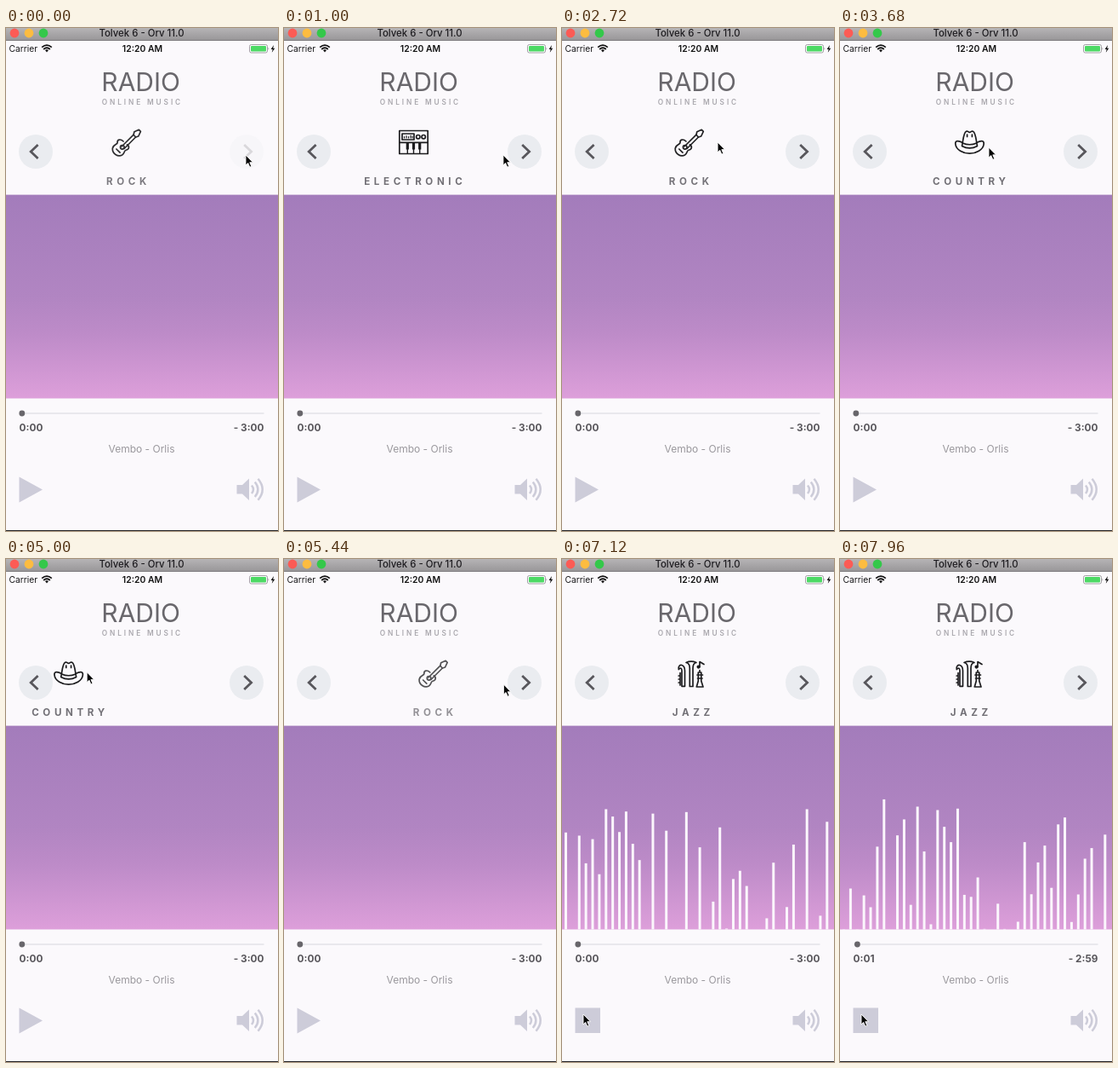
Recreate the animation shown at these times as an HTML page. Size 320 by 590 pixels, loop 8 s.

```html
<!DOCTYPE html>
<html lang="en">
<head>
<meta charset="utf-8">
<title>Radio player</title>
<style>
  html, body { margin: 0; width: 100%; height: 100%; overflow: hidden; background: #fbf9fc; }
  svg { display: block; width: 320px; height: 590px; font-family: Inter, Roboto, sans-serif; }
  .mid { text-anchor: middle; }
  .line { fill: none; stroke: #1c1c1e; stroke-width: 1.7; stroke-linecap: round; stroke-linejoin: round; }
  .label { font-size: 11.6px; font-weight: 700; letter-spacing: 4.6px; fill: #727076; text-anchor: middle; }
  .time { font-size: 11.8px; font-weight: 700; fill: #59575c; }
  .chevron { fill: none; stroke: #58575c; stroke-width: 2.8; }
  .control { fill: #cdccd9; }
</style>
</head>
<body>
<svg viewBox="0 0 320 590">
  <defs>
    <linearGradient id="chrome" x2="0" y2="1">
      <stop stop-color="#b6b4b6"/><stop offset="1" stop-color="#989698"/>
    </linearGradient>
    <linearGradient id="sky" x2="0" y2="1">
      <stop stop-color="#a37cbb"/><stop offset=".5" stop-color="#b185c2"/>
      <stop offset=".68" stop-color="#bd8bc8"/><stop offset="1" stop-color="#dd9fda"/>
    </linearGradient>
  </defs>
  <rect width="320" height="590" fill="#fbf9fc"/>

  <!-- window bar -->
  <rect width="320" height="14.5" fill="url(#chrome)"/>
  <rect y="14" width="320" height="1" fill="#7e7c7e"/>
  <circle cx="10" cy="6" r="5.4" fill="#fc5b55"/>
  <circle cx="27" cy="6" r="5.4" fill="#fdbc40"/>
  <circle cx="44" cy="6" r="5.4" fill="#34c84a"/>
  <text class="mid" x="159.5" y="10" font-size="11.4" font-weight="500" fill="#1e1c20">Tolvek 6 - Orv 11.0</text>

  <!-- status bar -->
  <text x="3.5" y="28" font-size="10.3" fill="#1a1a1c">Carrier</text>
  <g fill="none" stroke="#111" stroke-width="1.8">
    <path d="M42.2 22.6Q48 17.6 53.8 22.6M44.2 25Q48 21.6 51.8 25"/>
    <path d="M46 26L48 28.6 50 26Q48 24.6 46 26Z" fill="#111" stroke="none"/>
  </g>
  <text class="mid" x="160.5" y="28" font-size="10.4" font-weight="600" fill="#111">12:20 AM</text>
  <rect x="286.5" y="19.5" width="21" height="9.5" rx="2" fill="none" stroke="#8c8b8f" stroke-width=".8"/>
  <rect x="288" y="21" width="18" height="6.5" rx="1" fill="#4cd964"/>
  <path d="M308.5 22.5q1.6 1.7 0 3.4z" fill="#8c8b8f"/>
  <path d="M315 20L311.6 24.9H313.7L312.8 28.8 316.3 23.7H314.2Z" fill="#111"/>

  <!-- heading -->
  <text class="mid" x="158.7" y="74" font-size="30" font-weight="400" fill="#69676c">RADIO</text>
  <text class="mid" x="160.4" y="89.8" font-size="8.3" font-weight="600" letter-spacing="2.9" fill="#aaa8ae">ONLINE MUSIC</text>

  <!-- genres -->
  <g id="rock">
    <g class="line">
      <path d="M148.5 133C145 129.5 141 131 141.5 134.5C141.8 136.5 136 136.5 135.7 141.5C135.5 147.5 142 151.5 147 149C150.5 147 148.8 144 151.5 143.3C155.5 142.3 156 138.5 152.8 136.8"/>
      <path d="M146.5 139L160.5 125.2M149.5 141.5L163 128"/>
      <path d="M160.5 125.2L161.3 121.8 166.8 119.3 168.8 121.3 166.2 127 163 128Z"/>
      <circle cx="147.2" cy="139.8" r="2.3"/>
      <path d="M140.3 142L144.5 146.2"/>
    </g>
    <text class="label" x="154.3" y="184">ROCK</text>
  </g>
  <g id="electronic">
    <g class="line" stroke-linejoin="miter">
      <rect x="135.8" y="120.5" width="33.4" height="27"/>
      <path d="M135.8 134.3H169.2"/>
      <rect x="139" y="124" width="14" height="7"/>
      <path d="M141.5 129V127.5M144 129V126.5M146.5 129V127.5M149 129V126M151 129V127" stroke-width="1.2"/>
      <circle cx="157.8" cy="127.7" r="2.2"/><circle cx="164.2" cy="127.7" r="2.2"/>
      <path d="M145.3 135V142.5M152.5 135V142.5M159.7 135V142.5" stroke-width="3.2" stroke-linecap="butt"/>
      <path d="M145.3 142V147M152.5 142V147M159.7 142V147" stroke-width="1.4"/>
    </g>
    <text class="label" x="154.3" y="184">ELECTRONIC</text>
  </g>
  <g id="country">
    <g class="line">
      <path d="M143.5 138.5C145 132 145 123 148.5 121.2C150.5 120.3 151 122.4 152.5 122.4C154 122.4 154.5 120.3 156.5 121.2C160 123 160 132 161.5 138.5C156 141.5 149 141.5 143.5 138.5Z"/>
      <path d="M144.3 134.5C137.5 131 135.5 133 135.8 136C136.5 143 145 147.2 152.5 147.2C160 147.2 168.5 143 169.2 136C169.5 133 167.5 131 160.7 134.5"/>
      <path d="M145 135.3C149 137.2 156 137.2 160 135.3M149.6 125V127.5M155.4 125V127.5"/>
    </g>
    <text class="label" x="154.3" y="184">COUNTRY</text>
  </g>
  <g id="jazz">
    <g class="line">
      <path d="M146 121.5C149 122 150.3 124 150.3 128V149.5H154V128C154 124 155.3 122 158 121.5C154 119.8 150 119.8 146 121.5Z"/>
      <path d="M137.3 129.5C136.5 125.5 139 123.8 141 124.5C144.2 125.5 144.5 128 144.5 131V149.3H141V131C141 128 139.3 127.2 137.3 129.5Z"/>
      <path d="M139 133.5V148M137.2 137H139M137.2 141H139M137.2 145H139"/>
      <path d="M160.3 133V143L158.3 150H166L163.8 143V133ZM159 136H165.5M159.5 140H165M162 130.5V133"/>
      <path d="M162 126.5V120.5L167 123.5"/>
      <circle cx="160.6" cy="126.6" r="1.3" fill="#1c1c1e"/>
    </g>
    <text class="label" x="154.3" y="184">JAZZ</text>
  </g>

  <circle cx="35" cy="145" r="20" fill="#eaecf0"/>
  <path class="chevron" d="M37.6 137L29.2 145 37.6 153"/>
  <g id="next">
    <circle cx="283" cy="145" r="20" fill="#eaecf0"/>
    <path class="chevron" d="M280.2 137L288.6 145 280.2 153"/>
  </g>

  <!-- visualizer -->
  <rect y="195.6" width="320" height="238.9" fill="url(#sky)"/>
  <g id="bars" fill="#fbf6fc"></g>

  <!-- player -->
  <rect x="16" y="451" width="287.5" height="2" fill="#e9e8ed"/>
  <circle id="knob" cy="452" r="3.4" fill="#68666b"/>
  <text id="elapsed" class="time" x="15.6" y="473"></text>
  <text id="remaining" class="time" x="303.5" y="473" text-anchor="end"></text>
  <text class="mid" x="159.5" y="498" font-size="12" fill="#9a989d">Vembo - Orlis</text>
  <path id="play" class="control" d="M15.5 526.5V556.5L43 541.5Z"/>
  <rect id="stop" class="control" x="15.5" y="526.5" width="29.5" height="29.5"/>
  <path class="control" d="M271.5 536H278L286 528.5V554L278 546.5H271.5Z"/>
  <path d="M289 536.5Q293 541.3 289 546M292.8 532.5Q300 541.3 292.8 550M296.5 528.8Q307 541.3 296.5 553.7" fill="none" stroke="#cdccd9" stroke-width="2.5"/>
  <rect y="589" width="320" height="1" fill="#242326"/>

  <path id="cursor" d="M0 0V12L2.7 9.4 4.8 14.2 6.8 13.3 4.8 8.7H8.5Z" fill="#050505" stroke="#fff" stroke-width=".9"/>
</svg>
<script>
const LOOP = 8000, PLAY = 6840, SECOND = 7840;
const EXIT = 200, ENTER = 240, EXIT_TO = 130, ENTER_FROM = 95;
const BAR_COUNT = 40, BAR_GAP = 7.88, BAR_MAX = 158, BAR_STEP = 270, BASE = 434.5;
const $ = id => document.getElementById(id);
const clamp = k => Math.min(1, Math.max(0, k));
const mix = (a, b, k) => a + (b - a) * k;
const easeOut = k => 1 - (1 - k) ** 2;

const genres = ['country', 'rock', 'electronic', 'jazz'];
// dir -1 goes to the next genre, 1 to the previous; grab is where a drag begins.
const moves = [
  { at: -15, dir: -1 },
  { at: 2320, dir: 1, grab: 1900 },
  { at: 3000, dir: 1, grab: 2740 },
  { at: 5120, dir: -1, grab: 4700 },
  { at: 5560, dir: -1 },
  { at: 6160, dir: -1 }
];
moves.reduce((index, move) => {
  move.before = genres[index];
  move.after = genres[index - move.dir];
  return index - move.dir;
}, 1);

// Pointer stops: time, x, y.
const path = [
  [0, 282, 149], [700, 282, 149], [1000, 258, 149], [1900, 179, 134], [2320, 290, 132],
  [2740, 178, 134], [3000, 296, 134], [3680, 175, 140], [4100, 172, 197], [4700, 174, 137],
  [5120, 64, 131], [5480, 282, 149], [5660, 282, 149], [6080, 162, 348], [6600, 25, 534]
];
function pointer(t) {
  const i = path.findIndex(stop => stop[0] > t);
  if (i < 0) return path.at(-1).slice(1);
  if (i === 0) return path[0].slice(1);
  const [t0, x0, y0] = path[i - 1], [t1, x1, y1] = path[i];
  const k = (t - t0) / (t1 - t0);
  return [mix(x0, x1, k), mix(y0, y1, k)];
}
const dragged = (move, t) => move.grab === undefined ? 0 : pointer(t)[0] - pointer(move.grab)[0];

function genreState(t) {
  const i = moves.findLastIndex(move => move.at <= t);
  const move = moves[i], next = moves[i + 1], age = t - move.at;
  if (age < EXIT) {
    const k = age / EXIT;
    return { id: move.before, dx: mix(dragged(move, move.at), move.dir * EXIT_TO, k), opacity: 1 - k };
  }
  if (next?.grab <= t) return { id: move.after, dx: dragged(next, t), opacity: 1 };
  const k = easeOut(clamp((age - EXIT) / ENTER));
  return { id: move.after, dx: -move.dir * ENTER_FROM * (1 - k), opacity: k };
}

function nextOpacity(t) {
  const move = moves.findLast(m => m.at <= t);
  const clicked = move.grab === undefined && pointer(move.at)[0] > 262;
  return clicked ? mix(.2, 1, clamp((t - move.at - 20) / 220)) : 1;
}

function noise(i, step) {
  const n = Math.sin(i * 127.1 + step * 311.7) * 43758.5453;
  return n - Math.floor(n);
}
const level = (i, step) => step ? BAR_MAX * clamp(noise(i, step) * 1.35 - .3) : 0;

const bars = Array.from({ length: BAR_COUNT }, (_, i) => {
  const bar = document.createElementNS('http://www.w3.org/2000/svg', 'rect');
  bar.setAttribute('x', 3 + i * BAR_GAP);
  bar.setAttribute('width', 3);
  return $('bars').appendChild(bar);
});

function drawBars(t) {
  const phase = Math.max(0, (t - PLAY - 40) / BAR_STEP);
  const step = Math.floor(phase);
  bars.forEach((bar, i) => {
    const height = mix(level(i, step), level(i, step + 1), phase - step);
    bar.setAttribute('y', BASE - height);
    bar.setAttribute('height', t < PLAY ? 0 : height);
  });
}

const show = (id, on) => $(id).setAttribute('visibility', on ? 'visible' : 'hidden');

function draw(t) {
  const { id, dx, opacity } = genreState(t);
  genres.forEach(genre => show(genre, genre === id));
  $(id).setAttribute('transform', `translate(${dx} 0)`);
  $(id).setAttribute('opacity', opacity);
  $('next').setAttribute('opacity', nextOpacity(t));
  $('cursor').setAttribute('transform', `translate(${pointer(t)})`);

  const playing = t >= PLAY, seconds = t >= SECOND ? 1 : 0;
  show('play', !playing);
  show('stop', playing);
  $('elapsed').textContent = `0:0${seconds}`;
  $('remaining').textContent = seconds ? '- 2:59' : '- 3:00';
  $('knob').setAttribute('cx', 18.8 + seconds * 1.6);
  drawBars(t);
}

const start = performance.now();
function frame(now) {
  draw(Math.max(0, now - start) % LOOP);
  requestAnimationFrame(frame);
}
draw(0);
requestAnimationFrame(frame);
</script>
</body>
</html>
```
